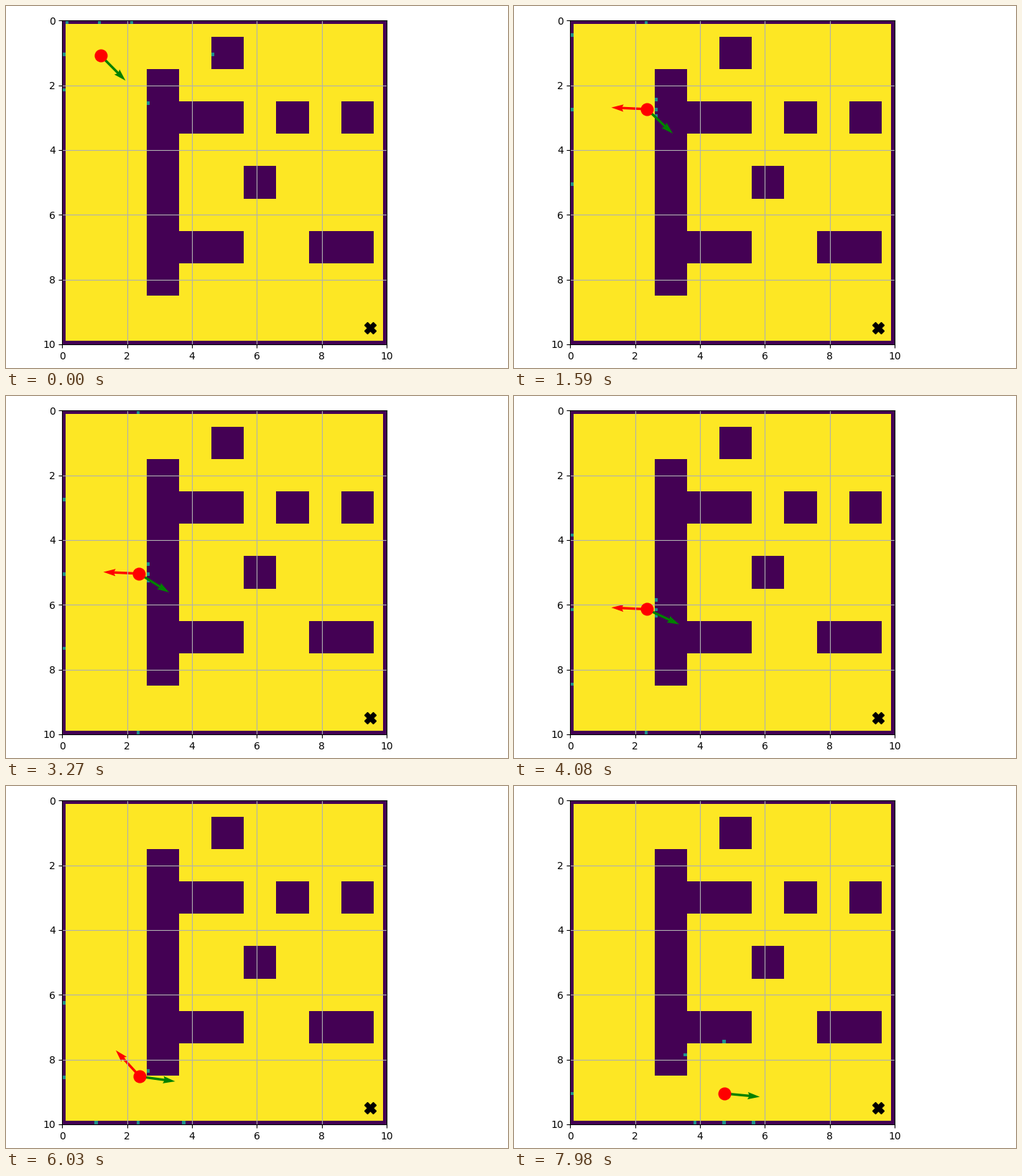
A matplotlib script for the animation above (8000 ms loop, 699 by 505 pixels).

```python
import numpy as np
import matplotlib.pyplot as plt
from matplotlib.animation import FuncAnimation

W, H, DPI = 699, 505, 100
LOOP, TICK = 8000, 25
LEFT, TOP, SIDE = 78.3, 20.17, 451.7    # plot area in pixels
GOAL = np.array([9.5, 9.5])
STRIDE, RANGE, NEAR = 0.05, 5.0, 0.45

# one-unit blocks, first one at x = 2.6, y = 0.5
PLAN = ["..#....",
        "#......",
        "###.#.#",
        "#......",
        "#..#...",
        "#......",
        "###..##",
        "#......"]

# toward the goal, down the wall, around its end, on to the goal
ROUTE = np.array([(1.178, 1.076), (2.365, 2.278), (2.365, 8.5),
                  (2.615, 8.75), (3.429, 8.927), (4.75, 9.05)])
walked = np.append(0, np.cumsum(np.hypot(*np.diff(ROUTE, axis=0).T)))

angles = np.arange(8) * np.pi / 4
reach = np.arange(0.02, RANGE + 0.001, 0.02)


def make_grid():
    """0.1-unit cells: 1 free, 0 wall."""
    grid = np.zeros((100, 100))
    grid[1:99, 1:99] = 1
    free = np.array([[c == "." for c in line] for line in PLAN], float)
    grid[5:85, 26:96] = np.kron(free, np.ones((10, 10)))
    return grid


def position(ms):
    steps = round(float(np.interp(ms, [0, 4080, 5250, 7980], [0, 111, 139, 209])))
    return np.array([np.interp(steps * STRIDE, walked, axis) for axis in ROUTE.T])


def scan(pos):
    """Cast eight rays; return (distance, angle, row, col) of each hit."""
    hits = []
    for a in angles:
        ray = pos + np.outer(reach, [np.cos(a), np.sin(a)])
        cols, rows = np.floor(ray * 10).astype(int).clip(0, 99).T
        wall = grid[rows, cols] == 0
        if wall.any():
            i = wall.argmax()
            hits.append((reach[i], a, rows[i], cols[i]))
    return hits


grid = make_grid()
fig = plt.figure(figsize=((W + 0.01) / DPI, (H + 0.01) / DPI), dpi=DPI)
ax = fig.add_axes([LEFT / W, (H - TOP - SIDE) / H, SIDE / W, SIDE / H])
image = ax.imshow(grid, cmap="viridis", vmin=0, vmax=1,
                  extent=[0, 10, 10, 0], aspect="auto")
ax.grid(True)
ax.plot(*GOAL, "kX", markersize=12)


def make_arrow(color):
    return ax.quiver([1], [1], [1], [0], color=color, scale=9.1,
                     scale_units="width", width=0.0075)


def point(arrow, pos, u, v):
    arrow.set_offsets([pos])
    arrow.set_UVC([u], [v])


goal_arrow = make_arrow("green")
wall_arrow = make_arrow("red")
robot, = ax.plot([], [], "ro", markersize=12)
ax.set(xlim=(0, 10), ylim=(10, 0),
       xticks=range(0, 11, 2), yticks=range(0, 11, 2))


def update(i):
    pos = position(i * TICK + 15)
    robot.set_data([pos[0]], [pos[1]])

    hits = scan(pos)
    view = grid.copy()
    for _, _, row, col in hits:
        view[row, col] = 0.5
    image.set_data(view)

    aim = (GOAL - pos) / np.hypot(*(GOAL - pos))
    point(goal_arrow, pos, aim[0], -aim[1])

    dist, a = min(hits)[:2]
    turn = a + np.pi - 0.045
    point(wall_arrow, pos, np.cos(turn), np.sin(turn))
    wall_arrow.set_visible(dist < NEAR)
    return image, goal_arrow, wall_arrow, robot


anim = FuncAnimation(fig, update, frames=LOOP // TICK, interval=TICK,
                     init_func=lambda: update(0), repeat=True, repeat_delay=0)
plt.show()
```
